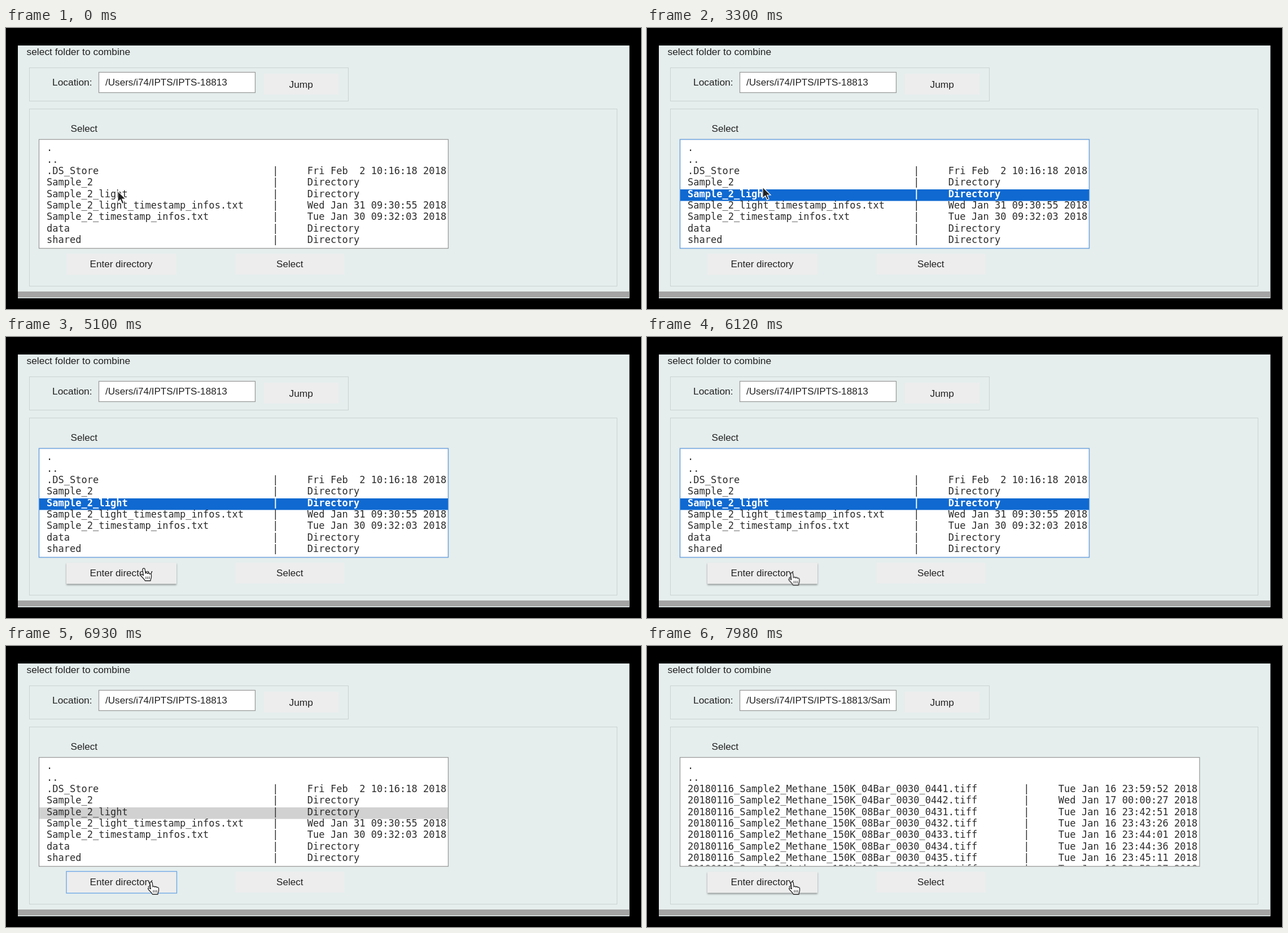
An HTML page for the animation above (8 s loop, 1125 px wide and 498 px high).

```html
<!DOCTYPE html>
<html lang="en">
<head>
<meta charset="utf-8">
<title>Folder selector</title>
<style>
  html, body { margin: 0; width: 100%; height: 100%; overflow: hidden; background: #000; }
  svg { display: block; width: 1125px; height: 498px; }
  text { font: 17.1px "Liberation Sans", Arial, sans-serif; fill: #222; white-space: pre; }
  .label { font-size: 17.4px; }
  .rows text { font: 17.06px "DejaVu Sans Mono", monospace; fill: #2c2c2c; }
  .rows .picked { font-weight: bold; fill: #fff; }
  .serif { font: 20.94px "Liberation Serif", serif; fill: #1c1c1c; }
  .code { font: 18.33px "Liberation Mono", monospace; }
  .h1 { font-size: 53px; fill: #253649; }
  .h2 { font-size: 38.5px; font-weight: bold; fill: #253649; }
  .frame { fill: none; stroke: #cbd3d2; }
  .field { fill: #fff; stroke: #9b9b9b; stroke-width: 1.3; }
  .focus { fill: none; stroke: #6fa8e6; stroke-width: 1.4; }
  .button { fill: #ededed; }
  .raised { filter: drop-shadow(0 2px 1.5px rgba(0, 0, 0, .38)); }
  .pressed { filter: drop-shadow(0 3px 2px rgba(0, 0, 0, .45)); }

  /* Hard state changes share one 8 s clock */
  .step { animation: 8s step-end infinite; }
  .dialog { animation-name: dialog; }
  .before { animation-name: before; }
  .after { animation-name: after; }
  .active { animation-name: active; }
  .plain { animation-name: plain; }
  .inactive { animation-name: inactive; }
  .hover { animation-name: hover; }
  .down { animation-name: down; }
  .loading { animation-name: loading; }
  .arrow { animation-name: arrow; }
  .hand { animation-name: hand; }
  @keyframes dialog { 0%, 90.75% { opacity: 1 } 87.375% { opacity: 0 } }
  @keyframes before { 0% { opacity: 1 } 87.375%, 100% { opacity: 0 } }
  @keyframes after { 0% { opacity: 0 } 90.75%, 100% { opacity: 1 } }
  @keyframes active { 0%, 82.125%, 100% { opacity: 0 } 26.25% { opacity: 1 } }
  @keyframes plain { 0%, 82.125%, 100% { opacity: 1 } 26.25% { opacity: 0 } }
  @keyframes inactive { 0%, 87.375%, 100% { opacity: 0 } 82.125% { opacity: 1 } }
  @keyframes hover { 0%, 82.125% { opacity: 0 } 57%, 90.75%, 100% { opacity: 1 } }
  @keyframes down { 0%, 82.125%, 100% { opacity: 0 } 81% { opacity: 1 } }
  @keyframes loading { 0%, 90.75%, 100% { opacity: 0 } 87.375% { opacity: 1 } }
  @keyframes arrow { 0% { opacity: 1 } 57%, 100% { opacity: 0 } }
  @keyframes hand { 0%, 87.375% { opacity: 0 } 57%, 90.75%, 100% { opacity: 1 } }

  .pointer { animation: travel 8s ease-in-out infinite; }
  @keyframes travel {
    0% { transform: translate(198px, 289px) }
    12%, 18% { transform: translate(195px, 296px) }
    26.25% { transform: translate(200px, 291px) }
    41.25%, 49% { transform: translate(205px, 282px) }
    58% { transform: translate(238px, 405px) }
    63.75%, 68% { transform: translate(244px, 410px) }
    78%, 100% { transform: translate(257px, 418px) }
  }
</style>
</head>
<body>
<svg viewBox="0 0 1125 498">
  <defs>
    <clipPath id="pathClip"><rect x="170" y="80" width="260" height="32"/></clipPath>
    <clipPath id="listClip"><rect x="59" y="198" width="920" height="191.5"/></clipPath>
    <linearGradient id="pilcrow" gradientUnits="userSpaceOnUse" x1="0" y1="404" x2="0" y2="440">
      <stop offset=".4" stop-color="#1669cf"/><stop offset=".6" stop-color="#6f8396"/>
    </linearGradient>
  </defs>

  <rect x="21" y="31" width="1083.5" height="448" fill="#e5eeed"/>

  <g class="step dialog">
    <text class="label" x="36.5" y="48">select folder to combine</text>
    <rect class="frame" x="41.5" y="70.5" width="565" height="59"/>
    <text class="label" x="82" y="101.5">Location:</text>
    <rect class="field" x="164.5" y="78.5" width="277" height="36"/>
    <g clip-path="url(#pathClip)">
      <text class="step before" x="176" y="101.5">/Users/i74/IPTS/IPTS-18813</text>
      <text class="step after" x="176" y="101.5">/Users/i74/IPTS/IPTS-18813/Sample_2_light</text>
    </g>
    <rect class="button" x="457" y="81" width="132" height="37"/>
    <text class="label" x="501.5" y="105.5">Jump</text>

    <rect class="frame" x="41.5" y="143.5" width="1041" height="314"/>
    <text x="114.5" y="184">Select</text>

    <g class="step before">
      <rect class="field" x="58.5" y="197.5" width="725" height="193"/>
      <rect class="step active focus" x="58.5" y="197.5" width="725" height="193"/>
      <rect class="step active" x="59" y="286" width="724" height="20.5" fill="#0f69d1"/>
      <rect class="step inactive" x="59" y="286" width="724" height="20.5" fill="#d1d1d2"/>
      <g class="rows" id="folders" clip-path="url(#listClip)"></g>
    </g>
    <g class="step after">
      <rect class="field" x="58.5" y="197.5" width="920.5" height="193"/>
      <g class="rows" id="images" clip-path="url(#listClip)"></g>
    </g>

    <rect class="button" x="107" y="400" width="195" height="37.5"/>
    <rect class="step hover button raised" x="107" y="400" width="195" height="37.5"/>
    <rect class="step down button pressed" x="107" y="400" width="195" height="37.5"/>
    <rect class="step inactive focus" x="107" y="399.5" width="195.5" height="38.5"/>
    <text x="148.5" y="424">Enter directory</text>
    <rect class="button" x="407" y="400" width="193" height="37"/>
    <text x="479" y="424">Select</text>
  </g>

  <g class="step loading">
    <text x="33.5" y="44">Please wait...</text>
    <rect x="21" y="82" width="1083.5" height="76" fill="#fff"/>
    <path d="M21 82.5H1104.5" stroke="#9da3a3"/>
    <text class="serif" x="50.5" y="118.5">Checking that number of files in each folder is identical</text>
    <path d="M1104.5 178.5H29Q27 178.5 27 180.5V214Q27 216 29 216H1104.5" fill="#f7f7f7" stroke="#cbcfcf"/>
    <text class="code" x="35.5" y="203.5">o_merge.check_number_of_files()</text>
    <rect x="21" y="236.5" width="1083.5" height="231" fill="#fff"/>
    <text class="h1" x="49" y="328">Merging Method</text>
    <text class="h2" x="49.5" y="432">How many folders do you want to combine together</text>
    <text class="h2" x="1022" y="432" style="fill:url(#pilcrow)">¶</text>
    <path d="M256 407.5Q259 407.5 259 410V425Q259 427.5 256 427.5M262 407.5Q259 407.5 259 410M259 425Q259 427.5 262 427.5M257 421H261" fill="none" stroke="#555" stroke-width="1.3"/>
  </g>

  <rect x="21" y="467" width="1083.5" height="10.5" fill="#a3a4a3"/>

  <g class="pointer">
    <path class="step arrow" d="M0 0V19.5L4.6 15.2 7.9 22.6 11 21.2 7.8 14H14Z" fill="#222" stroke="#fff" stroke-width="1.2"/>
    <g class="step hand" stroke="#222" stroke-width="1.3" stroke-linejoin="round">
      <path d="M-2 2.5C-2-1 2-1 2.3 2.5L3.2 9C3.6 7.3 6.6 7.4 6.8 9.4 7.4 7.8 10.2 8.2 10.2 10.2 11 9 13.6 9.6 13.5 12V15.5C13.4 18 12 19 12 22H2.5C1 18.5-2.5 16.5-5 12.8-6.2 10.6-3.4 9.4-.6 12.5Z" fill="#fff"/>
      <path d="M4 14.5V19M7 14.5V19M10 14.5V19" stroke-width="1"/>
    </g>
  </g>
</svg>

<script>
  const SVG = "http://www.w3.org/2000/svg";
  const day = (date, time) => `${date} ${time} 2018`;

  function addText(parent, row, value, state) {
    const text = document.createElementNS(SVG, "text");
    text.setAttribute("x", 72);
    text.setAttribute("y", 218.3 + row * 20.35);
    if (state) text.setAttribute("class", state);
    text.textContent = value;
    parent.append(text);
  }

  function fillList(id, entries, column, pickedName) {
    const list = document.getElementById(id);
    [["."], [".."], ...entries].forEach(([name, info], row) => {
      const line = info ? name.padEnd(column) + "|     " + info : name;
      const picked = name === pickedName;
      addText(list, row, line, picked ? "step plain" : "");
      if (picked) addText(list, row, line, "step active picked");
    });
  }

  fillList("folders", [
    [".DS_Store", day("Fri Feb  2", "10:16:18")],
    ["Sample_2", "Directory"],
    ["Sample_2_light", "Directory"],
    ["Sample_2_light_timestamp_infos.txt", day("Wed Jan 31", "09:30:55")],
    ["Sample_2_timestamp_infos.txt", day("Tue Jan 30", "09:32:03")],
    ["data", "Directory"],
    ["shared", "Directory"]
  ], 39, "Sample_2_light");

  const image = (bar, index, date, time) =>
    [`20180116_Sample2_Methane_150K_${bar}Bar_0030_0${index}.tiff`, day(date, time)];
  const times = ["23:42:51", "23:43:26", "23:44:01", "23:44:36", "23:45:11", "23:52:37"];

  fillList("images", [
    image("04", 441, "Tue Jan 16", "23:59:52"),
    image("04", 442, "Wed Jan 17", "00:00:27"),
    ...times.map((time, i) => image("08", 431 + i, "Tue Jan 16", time))
  ], 58);
</script>
</body>
</html>
```
